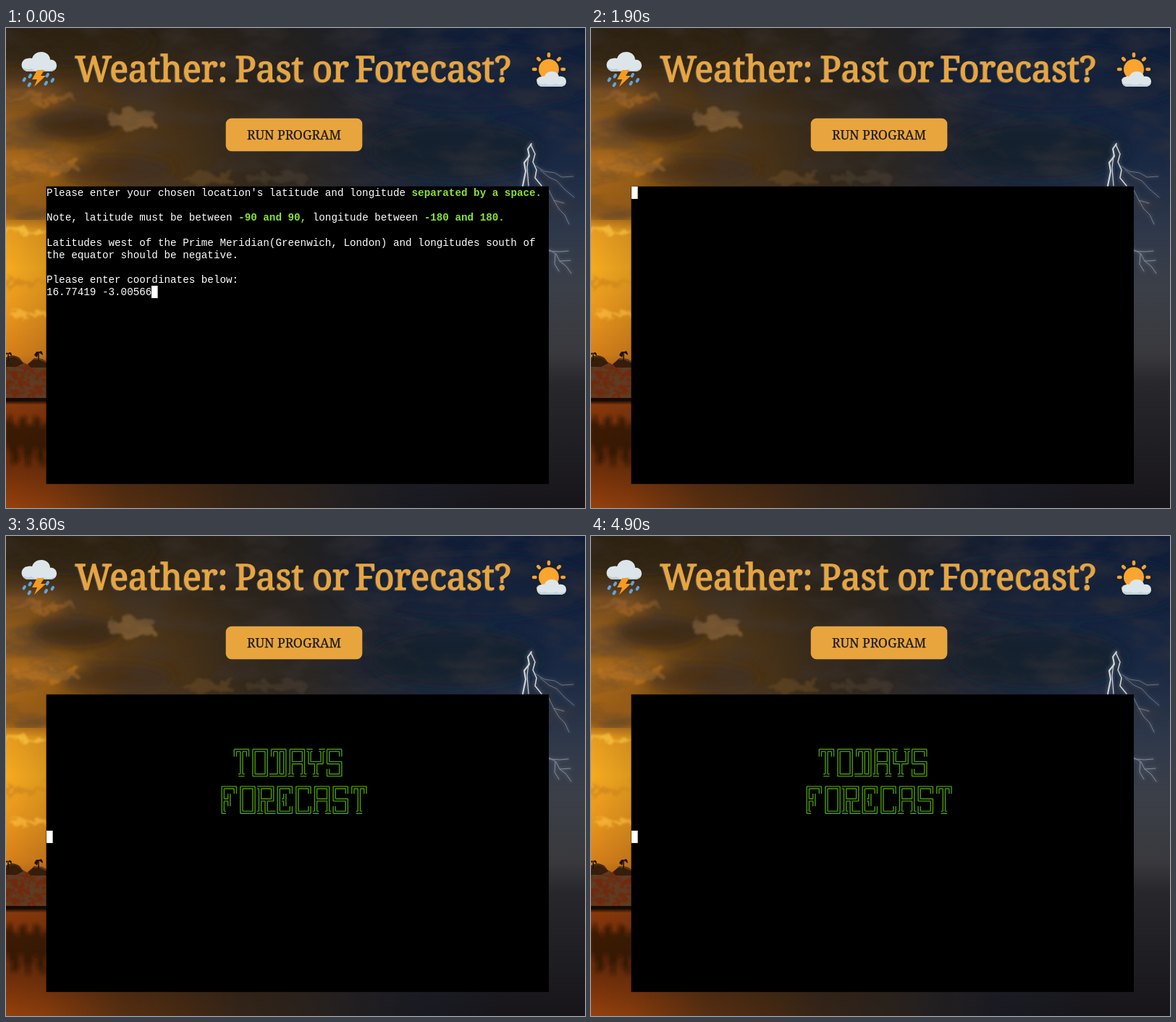
An HTML page for the animation above (5 s loop, 800 by 663 pixels).

```html
<!DOCTYPE html>
<html lang="en">
<head>
<meta charset="utf-8">
<title>Weather: Past or Forecast?</title>
<style>
  html, body { margin: 0; width: 100%; height: 100%; overflow: hidden; background: #1b1716; }
  svg { display: block; width: 100vw; height: 100vh; }
  .serif { font-family: "Merriweather", "Noto Serif", serif; text-anchor: middle; }
  #head { font-size: 48.3px; stroke-width: 1.3; }
  .mono { font: 14.25px "Liberation Mono", "Courier New", monospace; fill: #fff; white-space: pre; }
  .hot { font-weight: bold; fill: #8ae234; }
</style>
</head>
<body>
<svg viewBox="0 0 800 663">
  <defs>
    <linearGradient id="sky" x2="0" y2="1">
      <stop offset="0" stop-color="#0f1d39"/><stop offset=".28" stop-color="#1a2944"/>
      <stop offset=".42" stop-color="#2e384a"/><stop offset=".54" stop-color="#3b3f48"/>
      <stop offset=".68" stop-color="#39393d"/><stop offset=".74" stop-color="#27272c"/>
      <stop offset="1" stop-color="#17151a"/>
    </linearGradient>
    <linearGradient id="dusk" x2="0" y2="1">
      <stop offset="0" stop-color="#2c2418"/><stop offset=".1" stop-color="#513719"/>
      <stop offset=".18" stop-color="#8c591d"/><stop offset=".31" stop-color="#a6661b"/>
      <stop offset=".39" stop-color="#a8661a"/><stop offset=".42" stop-color="#e99d20"/>
      <stop offset=".5" stop-color="#f7ab20"/><stop offset=".6" stop-color="#e8951d"/>
      <stop offset=".68" stop-color="#d6801a"/><stop offset=".773" stop-color="#7a310e"/>
      <stop offset=".776" stop-color="#0f0804"/><stop offset=".785" stop-color="#8a390b"/>
      <stop offset=".84" stop-color="#763009"/><stop offset=".9" stop-color="#662a09"/>
      <stop offset="1" stop-color="#97410c"/>
    </linearGradient>
    <linearGradient id="across">
      <stop offset="0" stop-color="#fff"/><stop offset=".07" stop-color="#dcdcdc"/>
      <stop offset=".2" stop-color="#6a6a6a"/><stop offset=".4" stop-color="#222"/>
      <stop offset=".7" stop-color="#000"/>
    </linearGradient>
    <linearGradient id="middle">
      <stop offset="0" stop-color="#2a2214"/><stop offset=".3" stop-color="#292116"/>
      <stop offset=".52" stop-color="#22201e" stop-opacity=".88"/><stop offset=".85" stop-color="#182236" stop-opacity="0"/>
    </linearGradient>
    <mask id="fade"><rect width="800" height="663" fill="url(#across)"/></mask>
    <filter id="soft" x="-60%" y="-60%" width="220%" height="220%"><feGaussianBlur stdDeviation="9"/></filter>
    <filter id="fuzz" x="-60%" y="-60%" width="220%" height="220%"><feGaussianBlur stdDeviation="2.5"/></filter>
    <filter id="ragged" x="-40%" y="-60%" width="180%" height="220%">
      <feTurbulence type="fractalNoise" baseFrequency=".05 .07" numOctaves="4" seed="8"/>
      <feDisplacementMap in="SourceGraphic" scale="34" xChannelSelector="R" yChannelSelector="G"/>
      <feGaussianBlur stdDeviation="1.8"/>
    </filter>
    <filter id="cloudy" x="0" y="0" width="100%" height="100%">
      <feTurbulence type="fractalNoise" baseFrequency=".013 .03" numOctaves="5" seed="21"/>
      <feColorMatrix values="0 0 0 0 .05  0 0 0 0 .04  0 0 0 0 .04  3 0 0 0 -1.25"/>
    </filter>
    <filter id="leaves" x="0" y="0" width="100%" height="100%">
      <feTurbulence type="fractalNoise" baseFrequency=".12 .16" numOctaves="3" seed="5"/>
      <feColorMatrix values="0 0 0 0 .1  0 0 0 0 .05  0 0 0 0 .02  5 0 0 0 -2"/>
      <feComposite in2="SourceAlpha" operator="in"/>
    </filter>
    <clipPath id="shore"><rect width="800" height="514"/></clipPath>
    <g id="head" class="serif">
      <text x="201" y="74">Weather:</text><text x="364" y="74">Past</text>
      <text x="448.5" y="74">or</text><text x="590" y="74">Forecast?</text>
    </g>
    <path id="mound" d="M0 460Q9 450 20 460L30 465 39 456 50 457 62 464V514H0Z"/>
  </defs>

  <rect width="800" height="663" fill="url(#sky)"/>
  <rect width="800" height="663" fill="url(#middle)"/>
  <rect width="800" height="663" fill="url(#dusk)" mask="url(#fade)"/>
  <g filter="url(#soft)">
    <ellipse cx="70" cy="20" rx="130" ry="34" fill="#2b2215" opacity=".75"/>
    <ellipse cx="30" cy="92" rx="52" ry="9" fill="#b5702a" opacity=".5"/>
    <ellipse cx="95" cy="133" rx="62" ry="22" fill="#332410" opacity=".75"/>
    <ellipse cx="45" cy="186" rx="70" ry="13" fill="#c47b23" opacity=".55"/>
    <ellipse cx="150" cy="196" rx="80" ry="20" fill="#3f2b15" opacity=".6"/>
    <ellipse cx="18" cy="245" rx="48" ry="12" fill="#8a5517" opacity=".6"/>
    <ellipse cx="620" cy="170" rx="120" ry="40" fill="#1a202b" opacity=".6"/>
    <ellipse cx="640" cy="70" rx="180" ry="45" fill="#16223a" opacity=".5"/>
  </g>
  <g filter="url(#ragged)">
    <ellipse cx="176" cy="126" rx="33" ry="11" fill="#86643a" opacity=".75"/>
    <ellipse cx="45" cy="96" rx="48" ry="5" fill="#ad6c29" opacity=".55"/>
    <ellipse cx="280" cy="208" rx="36" ry="9" fill="#694e2d" opacity=".55"/>
    <ellipse cx="375" cy="207" rx="38" ry="8" fill="#514233" opacity=".5"/>
    <ellipse cx="55" cy="193" rx="50" ry="6" fill="#c98026" opacity=".5"/>
    <ellipse cx="22" cy="281" rx="44" ry="4" fill="#ffd04a" opacity=".6"/>
    <ellipse cx="25" cy="351" rx="40" ry="4" fill="#cd851c" opacity=".7"/>
    <ellipse cx="35" cy="397" rx="40" ry="3" fill="#ffc345" opacity=".6"/>
  </g>
  <rect width="800" height="265" filter="url(#cloudy)" opacity=".38"/>

  <g clip-path="url(#shore)">
    <use href="#mound" fill="#70290d"/>
    <use href="#mound" filter="url(#leaves)" opacity=".85"/>
    <path d="M0 455q9-6 19 1l5 7-10 5H0zM30 464l8-6 10 1 10 5v5H34z" fill="#2b1809" opacity=".8"/>
    <path d="M45 460V447M3 460V449" stroke="#1d1108" stroke-width="1.5"/>
    <path d="M39 452q3-7 6-4 5-5 6 4l-6-4-2 7zM-2 453q2-6 5-4 5-3 5 4l-5-4z" fill="#1d1108"/>
  </g>
  <g id="water" filter="url(#fuzz)"></g>
  <rect y="511" width="56" height="4" fill="#160a05"/>

  <g id="bolts" fill="none" stroke-linecap="round" stroke-linejoin="round"></g>

  <g>
    <path d="M31 60a9 9 0 0 1-1-18q3-1 6 0c2-6 7-9 13-9 7 0 12 5 12 11 5-1 9 3 9 8s-4 8-9 8z" fill="#dce6ea"/>
    <path d="M23 54q5 5 12 2 7 6 15 1 10 4 18-1-2 4-7 4H31q-6 0-8-6z" fill="#c0ced7"/>
    <path d="M43 58h10l-5 8h7L39 81l4-10h-7z" fill="#f59a23"/>
    <path id="rain" stroke="#5aa6e8" stroke-width="4" stroke-linecap="round"/>
  </g>
  <g>
    <g id="rays" stroke="#f8a42f" stroke-width="4.5" stroke-linecap="round"></g>
    <circle cx="750" cy="57" r="14" fill="#fba52e"/>
    <path d="M741 81a7 7 0 0 1-1-14q2-1 4 0c1-4 5-7 10-7 6 0 9 3 10 7 6-1 10 2 10 7s-4 7-8 7z" fill="#dce6ea"/>
    <path d="M735 76q5 3 10 1 7 3 14 0 8 3 14 0-2 4-7 4h-25q-5 0-6-5z" fill="#c5d3da"/>
  </g>

  <use href="#head" x="-1" y="1" fill="#3d4d66" stroke="#3d4d66"/>
  <use href="#head" fill="#e8a53e" stroke="#e8a53e"/>
  <rect x="303.7" y="124.7" width="188.6" height="45.6" rx="8" fill="#e8a53e"/>
  <text class="serif" x="398" y="153.5" font-size="17.6" fill="#1b1c22" stroke="#1b1c22" stroke-width=".25">RUN PROGRAM</text>

  <rect x="55.6" y="218.8" width="694.4" height="411"/>
  <g id="prompt" class="mono"></g>
  <path id="banner" fill="none" stroke="#4e9a06" stroke-width="1.4"/>
  <rect id="cursor" width="8.6" height="17.1" fill="#fff"/>
</svg>
<script>
const $ = id => document.getElementById(id);
const LOOP = 5000, ENTER = 1000, CLEAR = 1900, SHOW = 2900;
const LEFT = 56, TOP = 219, CW = 8.552, RH = 17.125;
const colX = c => LEFT + c * CW, rowY = r => TOP + r * RH;

// Scenery
const strokes = [
  ["M726 160L721 167 723 177 716 186 718 198 714 218", 2.1],
  ["M725 161L731 174 728 185 733 196 731 207 740 218", 1.5],
  ["M722 176L720 193 722 218", 1.2],
  ["M731 190L744 198 758 200 768 206 784 205", .7],
  ["M738 196L750 206 761 211 771 222 785 234", .7],
  ["M750 224L757 238 764 250 772 258 778 271M757 238L771 242", .8],
  ["M750 306L760 312 765 322 774 329 781 339M750 308L765 309 777 308M759 312L758 326 764 336M765 322L780 321", 1]
];
$("bolts").innerHTML = strokes.map(([d, w]) =>
  `<path d="${d}" stroke="#8b98ac" stroke-width="${w * 3}" opacity=".28" filter="url(#fuzz)"/>` +
  `<path d="${d}" stroke="${w > 1.1 ? "#d3d6d6" : "#858d98"}" stroke-width="${w}"/>`).join("");

$("water").innerHTML = Array.from({ length: 12 }, (_, i) => {
  const h = 34 + 24 * Math.abs(Math.sin(i * 2.3));
  return `<rect x="${i * 5 - 2}" y="${543 - 8 * Math.sin(i * 1.7)}" width="5" height="${h}" fill="#251005" opacity=".7"/>`;
}).join("");

$("rays").innerHTML = Array.from({ length: 8 }, (_, i) =>
  `<path d="M750 38.5V36" transform="rotate(${i * 45} 750 57)"/>`).join("");

$("rain").setAttribute("d", [[34, 65], [26, 70], [33, 77], [58, 64], [56, 75], [65, 71]]
  .map(([x, y]) => `M${x} ${y}l-1.5 2.5`).join(""));

// Terminal text: row, column, words, highlighted
const lines = [
  [0, 0, "Please enter your chosen location's latitude and longitude"],
  [0, 59, "separated by a space.", true],
  [2, 0, "Note, latitude must be between"],
  [2, 31, "-90 and 90,", true],
  [2, 43, "longitude between"],
  [2, 61, "-180 and 180.", true],
  [4, 0, "Latitudes west of the Prime Meridian(Greenwich, London) and longitudes south of"],
  [5, 0, "the equator should be negative."],
  [7, 0, "Please enter coordinates below:"],
  [8, 0, "16.77419 -3.00566"]
];
$("prompt").innerHTML = lines.map(([r, c, words, hot]) =>
  `<text x="${colX(c)}" y="${rowY(r) + 13.2}"${hot ? ' class="hot"' : ""}>${words}</text>`).join("");

// Double-line box characters; arm bits are N=1 E=2 S=4 W=8
const arms = { "═": 10, "║": 5, "╔": 6, "╗": 12, "╚": 3, "╝": 9, "╠": 7, "╣": 13, "╦": 14, "╩": 11 };
function boxChar(ch, col, row) {
  const m = arms[ch];
  if (!m) return "";
  const x = colX(col + .5), y = rowY(row + .5), d = 1.6, w = CW / 2, h = RH / 2;
  const line = (a, b, c, e) => `M${x + a} ${y + b}L${x + c} ${y + e}`;
  const pair = (s, vertical) => vertical
    ? line(-d, s * d, -d, s * h) + line(d, s * d, d, s * h)
    : line(s * d, -d, s * w, -d) + line(s * d, d, s * w, d);
  return (m & 1 ? pair(-1, true) : line(-d, -d, d, -d)) +
         (m & 2 ? pair(1, false) : line(d, -d, d, d)) +
         (m & 4 ? pair(1, true) : line(-d, d, d, d)) +
         (m & 8 ? pair(-1, false) : line(-d, -d, -d, d));
}
const letters = {
  T: ["╔╦╗", " ║ ", " ╩ "], O: ["╔═╗", "║ ║", "╚═╝"], D: ["╔╦╗", " ║║", "═╩╝"],
  A: ["╔═╗", "╠═╣", "╩ ╩"], Y: ["╦ ╦", "╚╦╝", " ╩ "], S: ["╔═╗", "╚═╗", "╚═╝"],
  F: ["╔═╗", "╠╣ ", "╚  "], R: ["╦═╗", "╠╦╝", "╩╚═"], E: ["╔═╗", "║╣ ", "╚═╝"],
  C: ["╔═╗", "║  ", "╚═╝"]
};
const bigWord = (word, col, row) => [...word].map((l, i) =>
  letters[l].map((s, r) => [...s].map((ch, c) => boxChar(ch, col + i * 3 + c, row + r)).join("")).join("")).join("");
$("banner").setAttribute("d", bigWord("TODAYS", 30, 4) + bigWord("FORECAST", 28, 7));

function draw(t) {
  const [col, row] = t < ENTER ? [17, 8] : t < CLEAR ? [0, 9] : t < SHOW ? [0, 0] : [0, 11];
  $("prompt").style.display = t < CLEAR ? "" : "none";
  $("banner").style.display = t >= SHOW ? "" : "none";
  $("cursor").setAttribute("x", Math.round(colX(col)));
  $("cursor").setAttribute("y", Math.round(rowY(row)));
}
function tick() {
  draw(performance.now() % LOOP);
  requestAnimationFrame(tick);
}
tick();
</script>
</body>
</html>
```
